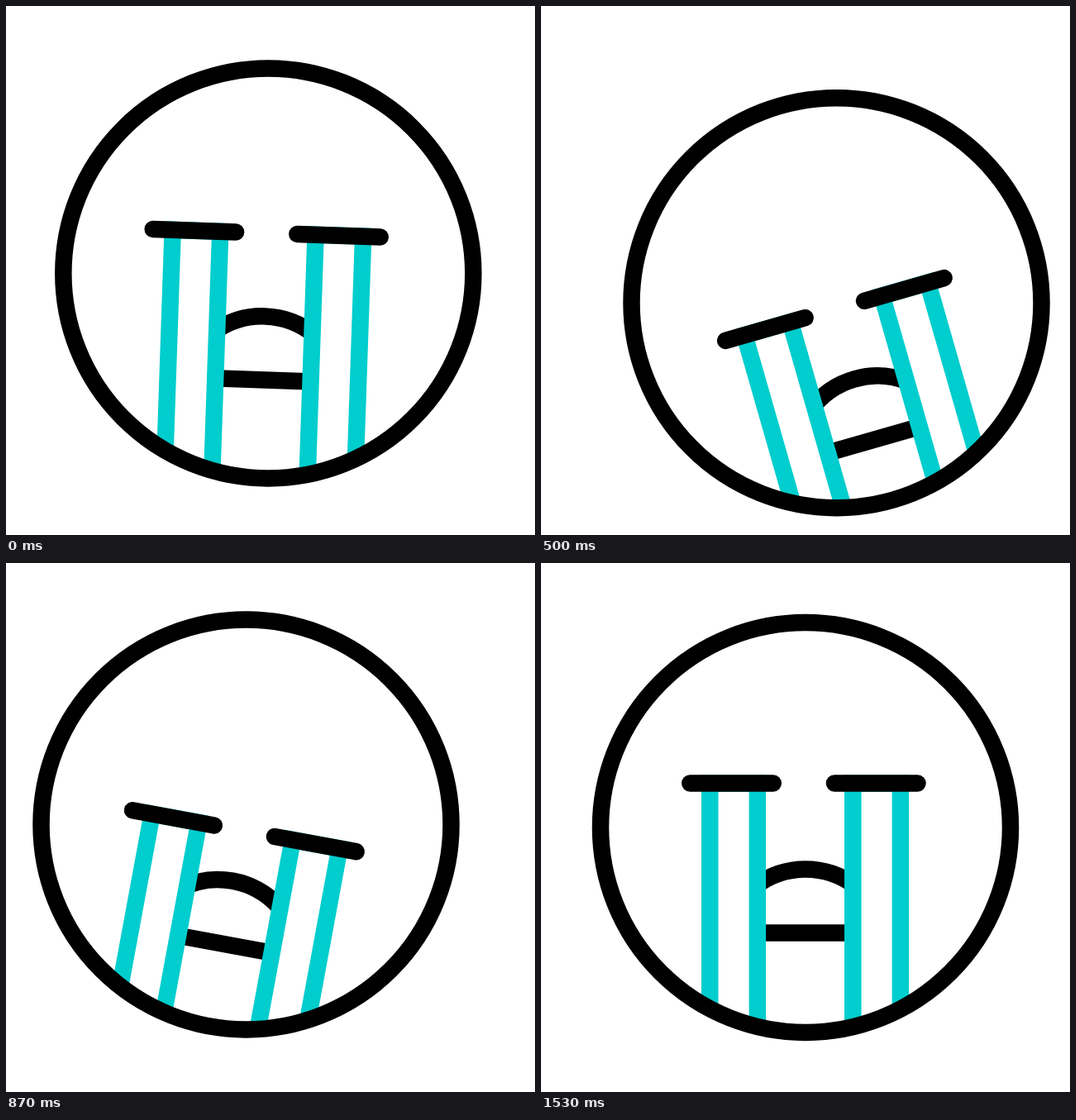
These frames come from a looping animation (640x640 px, 1670 ms). An HTML page with a canvas:

```html
<!DOCTYPE html>
<html>
<head>
<meta charset="utf-8">
<title>Crying face</title>
<style>
html, body { margin: 0; width: 100%; height: 100%; overflow: hidden; background: #fff; }
canvas { display: block; }
</style>
</head>
<body>
<canvas id="stage" width="640" height="640"></canvas>
<script>
const ctx = document.getElementById('stage').getContext('2d');
const LOOP = 1670, STEP = 100 / 3, LAST_STEP = 46;
const RADIUS = 248, STROKE = 20.5;

// Eased progress from 0 to 1 between two times in ms.
function ease(t, start, end) {
  const u = Math.min(1, Math.max(0, (t - start) / (end - start)));
  return u * u * (3 - 2 * u);
}

function poseAt(t) {
  const left = ease(t, -55, 267), right = ease(t, 274, 559);
  const back = ease(t, 565, 867), home = ease(t, 867, 1167);
  const lift = ease(t, 1033, 1267), settle = ease(t, 1267, 1533);
  return {
    faceX: 320 - 34.5 * left + 81 * right - 76 * back + 29.5 * home,
    faceY: 320 + 45 * left - 6.5 * right - 42 * back + 3.5 * home,
    eyeY: -53.5 + 61.25 * left - 93.25 * lift + 32 * settle,
    mouthX: -5 * left + 3 * right - 3 * back + 5 * settle,
    mouthY: 181 - 43 * left + 30 * right - 29 * back - 15.8 * home + 25.8 * lift + 32 * settle,
    tilt: 17.5 * ease(t, -55, 210) - 37 * ease(t, 245, 560) + 35 * ease(t, 560, 770)
      - 16.5 * ease(t, 770, 1033) + lift
  };
}

function line(x0, x1, y) {
  ctx.beginPath();
  ctx.moveTo(x0, y);
  ctx.lineTo(x1, y);
  ctx.stroke();
}

function circle() {
  ctx.beginPath();
  ctx.arc(0, 0, RADIUS, 0, 2 * Math.PI);
}

function drawMouth(x, y) {
  ctx.strokeStyle = '#000';
  ctx.lineCap = 'butt';
  line(x - 60, x + 60, y);
  ctx.beginPath();
  ctx.arc(x, y + 23, 100, -Math.PI / 2 - 0.65, -Math.PI / 2 + 0.65);
  ctx.stroke();
}

function drawTears(x) {
  ctx.fillStyle = '#fff';
  ctx.strokeStyle = '#00cdcd';
  ctx.fillRect(x, 0, 57.6, 500);
  ctx.strokeRect(x, 0, 57.6, 500);
}

function drawEye(x) {
  ctx.strokeStyle = '#000';
  ctx.lineCap = 'round';
  line(x, x + 100.5, 0);
}

function draw(t) {
  const pose = poseAt(t);
  ctx.fillStyle = '#fff';
  ctx.fillRect(0, 0, 640, 640);
  ctx.lineWidth = STROKE;
  ctx.save();
  ctx.translate(pose.faceX, pose.faceY);

  ctx.save();
  circle();
  ctx.clip();
  ctx.translate(-2, pose.eyeY);
  ctx.rotate(pose.tilt * Math.PI / 180);
  drawMouth(2 + pose.mouthX, pose.mouthY);
  [-113.7, 59.3].forEach(drawTears);
  [-137.7, 37].forEach(drawEye);
  ctx.restore();

  ctx.strokeStyle = '#000';
  circle();
  ctx.stroke();
  ctx.restore();
}

function tick() {
  const step = Math.floor((performance.now() % LOOP + 4) / STEP);
  draw(Math.min(step, LAST_STEP) * STEP);
  requestAnimationFrame(tick);
}
tick();
</script>
</body>
</html>
```
